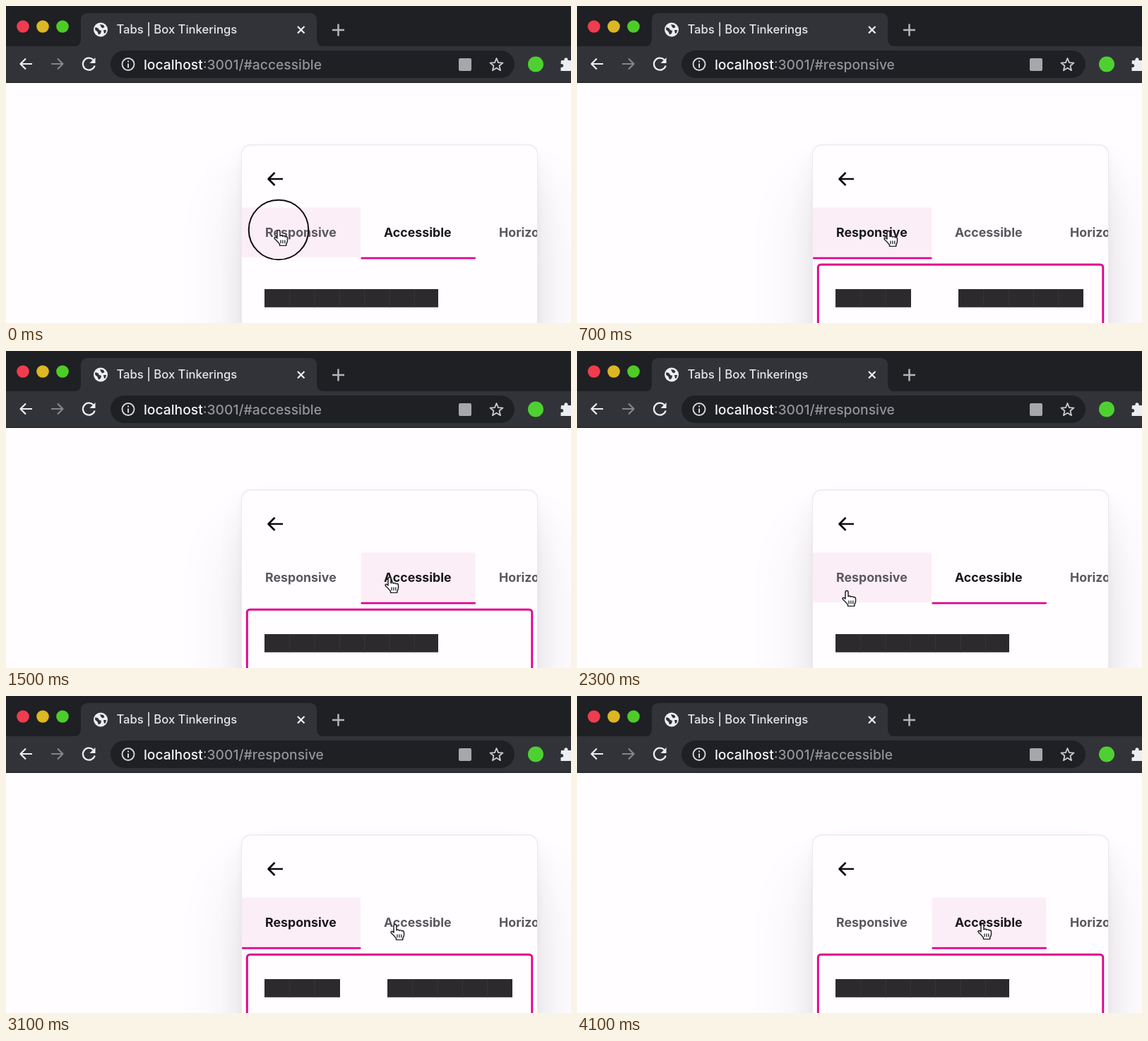
An HTML page with a canvas for the animation above (4200 ms loop, 800 by 449 pixels).

```html
<!DOCTYPE html>
<html lang="en">
<head>
<meta charset="utf-8">
<title>Tabs</title>
<style>
html, body { margin: 0; width: 100%; height: 100%; overflow: hidden; background: #fffdff; }
canvas { display: block; }
</style>
</head>
<body>
<canvas id="stage" width="800" height="449"></canvas>
<script>
const ctx = document.getElementById('stage').getContext('2d');
const LOOP = 4200, STEP = 100, SLIDE = 450;
const FONT = 'Inter, Roboto, sans-serif';
const PAGE = '#fffdff', PINK = '#e0058c', STRIP = '#1e2024', BAR = '#323338', LIGHT = '#eceef1';
const CARD = { x: 334, y: 197, w: 418 };
const TABS = [
  { label: 'Responsive', hash: 'responsive', x: 334, w: 168.5, tx: 367 },
  { label: 'Accessible', hash: 'accessible', x: 502.5, w: 162.5, tx: 535 },
  { label: 'Horizontal', x: 665, w: 160, tx: 698 }
];
const BARS = [[[366, 107], [540, 177]], [[366, 246]]];

// [time, tab]
const CLICKS = [[-600, 1], [100, 0], [1050, 1], [2300, 0], [3600, 1]];
const HOVERS = [[0, 0], [900, 1], [2300, 0], [3200, 1]];
// [time, x, y] of the pointer tip
const PATH = [
  [0, 386, 317], [200, 386, 317], [500, 415, 317], [700, 441, 318],
  [900, 546, 321], [1100, 546, 321], [1500, 543, 320], [1600, 545, 320],
  [1900, 636, 326], [2200, 381, 340], [2300, 382, 339], [3000, 382, 339],
  [3100, 551, 323], [3400, 574, 322], [LOOP, 574, 322]
];

const HAND = new Path2D('M5 3c0-3.2 4-3.2 4 0v6.2c1-1.3 3.2-1 3.7.4c1-1 3-.8 3.5.7c1.2-.8 3.3-.3 3.3 2v4c0 2-1.5 3.5-1.7 5v2H8.5v-2c-1.5-2-3-4.5-5.5-6.5c-2-1.8-2.5-3-1.5-3.8c1.2-.8 2.3.2 3.5 1.6z');
const FINGERS = new Path2D('M10 15v5M12.9 15v5M15.8 15v5');
const LAND = new Path2D('M126.5 30l4 1.5 1.5 2.5 3 1-1 4-3 1.5-1.5-4-3.5-3zM133 26l5 1 1.5 3-3 1.5-2-2zM138 34h4l-1 4-2 1z');
const PUZZLE = new Path2D('M786 77h4.5c-1-5 6-5 5 0h9v15h-19v-5c5 1 5-6 0-5z');

const mix = (a, b, p) => a + (b - a) * p;
const ease = p => p * p * (3 - 2 * p);
const latest = (list, t) => list.filter(k => k[0] <= t).pop();

function rect(x, y, w, h, color, r = 0) {
  ctx.fillStyle = color;
  ctx.beginPath();
  ctx.roundRect(x, y, w, h, r);
  ctx.fill();
}

function disc(x, y, r, color) {
  ctx.fillStyle = color;
  ctx.beginPath();
  ctx.arc(x, y, r, 0, Math.PI * 2);
  ctx.fill();
}

function stroke(d, color, width) {
  ctx.strokeStyle = color;
  ctx.lineWidth = width;
  ctx.stroke(typeof d === 'string' ? new Path2D(d) : d);
}

function ring(x, y, r, color, width) {
  const p = new Path2D();
  p.arc(x, y, r, 0, Math.PI * 2);
  stroke(p, color, width);
}

function text(s, x, y, font, color) {
  ctx.font = font + ' ' + FONT;
  ctx.fillStyle = color;
  ctx.fillText(s, x, y);
  return x + ctx.measureText(s).width;
}

function star(x, y, r) {
  const p = new Path2D();
  for (let i = 0; i < 10; i++) {
    const a = i * Math.PI / 5 - Math.PI / 2, d = i % 2 ? r * 0.44 : r;
    p.lineTo(x + d * Math.cos(a), y + d * Math.sin(a));
  }
  p.closePath();
  return p;
}

function drawBrowser(hash) {
  rect(0, 0, 800, 58, STRIP);
  rect(0, 57, 800, 51, BAR);
  rect(0, 108, 800, 1, '#1b1c1f');
  ctx.fillStyle = BAR;
  ctx.fill(new Path2D('M96 57q10 0 10-10V20q0-10 10-10H430q10 0 10 10V47q0 10 10 10z'));
  ['#f03c4e', '#dcb723', '#4dcc28'].forEach((c, i) => disc(24 + 28 * i, 29, 8.8, c));

  disc(134, 33.5, 10, LIGHT);
  ctx.fillStyle = BAR;
  ctx.fill(LAND);
  text('Tabs | Box Tinkerings', 156.5, 39, '500 16.6px', '#e6e7ea');
  stroke('M413 29l9.5 9.5m0-9.5l-9.5 9.5', LIGHT, 2.2);
  stroke('M462 34h17m-8.5-8.5v17', '#b4b6b9', 2.5);

  stroke('M37 82H20.5m7.5-7.5l-7.5 7.5 7.5 7.5', LIGHT, 2.2);
  stroke('M64 82h16.5m-7.5-7.5l7.5 7.5-7.5 7.5', '#83858a', 2.2);
  stroke('M123.6 76.3A8.5 8.5 0 1 0 125.6 84.5', LIGHT, 2.3);
  ctx.fillStyle = LIGHT;
  ctx.fill(new Path2D('M126.5 73v8h-8z'));

  rect(148, 63, 572, 39, STRIP, 19.5);
  ring(173, 82.5, 8.5, '#d5d7da', 1.9);
  rect(172, 81.5, 2, 6, '#d5d7da');
  rect(172, 77.5, 2, 2, '#d5d7da');
  const end = text('localhost', 195, 89.5, '500 19.25px', '#f3f4f6');
  text(':3001/#' + hash, end, 89.5, '500 19.25px', '#929499');
  rect(641, 74, 18, 18, '#a5a7ab', 2);
  stroke(star(694.5, 83.5, 9.5), '#c9cbcf', 1.8);
  disc(750, 82.5, 11, '#4ed032');
  ctx.fillStyle = LIGHT;
  ctx.fill(PUZZLE);
}

function drawBar(x, w) {
  rect(x, 401, w, 25.7, '#2d2a2e');
  for (let s = 35.3; s < w - 5; s += 35.3) rect(x + s, 401, 1, 25.7, '#39363a');
}

function drawCard(p, hover, focus) {
  const { x, y, w } = CARD;
  ctx.save();
  ctx.beginPath();
  ctx.rect(0, 108.5, 800, 341);
  ctx.clip();
  [[70, 90, 0.13], [24, 36, 0.07], [3, 8, 0.05]].forEach(([dy, blur, a]) => {
    ctx.shadowColor = `rgba(68,62,70,${a})`;
    ctx.shadowOffsetY = dy;
    ctx.shadowBlur = blur;
    rect(x, y, w, 700, '#fff', 14);
  });
  ctx.restore();

  ctx.save();
  rect(x - 1, y - 1, w + 2, 702, '#eceaf0', 14);
  rect(x, y + 0.5, w, 700, PAGE, 13);
  ctx.beginPath();
  ctx.roundRect(x, y, w, 700, 13);
  ctx.clip();
  stroke('M392 245H371.5m9-9l-9 9 9 9', '#0b0a0c', 2.6);

  const h = TABS[hover];
  rect(h.x, 285.5, h.w - 0.5, 70.5, '#fceef6');
  TABS.forEach((tab, i) => {
    const on = i === 0 ? 1 - p : i === 1 ? p : 0;
    const c = [[91, 26], [87, 23], [95, 28]].map(([a, b]) => Math.round(mix(a, b, on)));
    text(tab.label, tab.tx, 327, '700 17.75px', `rgb(${c})`);
  });
  const [a, b] = TABS;
  rect(mix(a.x, b.x, p), 355.8, mix(a.w, b.w, p), 2.8, PINK, 1);

  BARS.forEach((bars, i) => bars.forEach(([bx, bw]) => drawBar(bx + (i - p) * w, bw)));
  if (focus) {
    const box = new Path2D();
    box.roundRect(341.3, 366.2, 403.5, 200, 4);
    stroke(box, PINK, 2.9);
  }
  ctx.restore();
}

function drawPointer(t) {
  const i = Math.max(0, PATH.findIndex(k => k[0] > t) - 1);
  const [t0, x0, y0] = PATH[i], [t1, x1, y1] = PATH[i + 1];
  const p = (t - t0) / (t1 - t0);
  const x = mix(x0, x1, p), y = mix(y0, y1, p);
  if (t < 100) ring(x, y, 42.3, '#0c0b0d', 2);
  ctx.save();
  ctx.translate(x - 7, y);
  ctx.scale(1, 0.96);
  ctx.fillStyle = '#fff';
  ctx.fill(HAND);
  stroke(HAND, '#242226', 1.5);
  stroke(FINGERS, '#242226', 1.3);
  ctx.restore();
}

function draw(t) {
  const [start, tab] = latest(CLICKS, t);
  const k = ease(Math.min(1, (t - start) / SLIDE));
  const p = tab ? k : 1 - k;
  const focus = t >= 100 && t - start >= SLIDE;
  rect(0, 0, 800, 449, PAGE);
  drawCard(p, latest(HOVERS, t)[1], focus);
  drawBrowser(TABS[tab].hash);
  drawPointer(t);
}

const began = performance.now();
let shown = -1;
function frame() {
  const t = Math.floor((performance.now() - began) % LOOP / STEP) * STEP;
  if (t !== shown) draw(shown = t);
  requestAnimationFrame(frame);
}
ctx.lineJoin = 'round';
draw(0);
requestAnimationFrame(frame);
</script>
</body>
</html>
```
